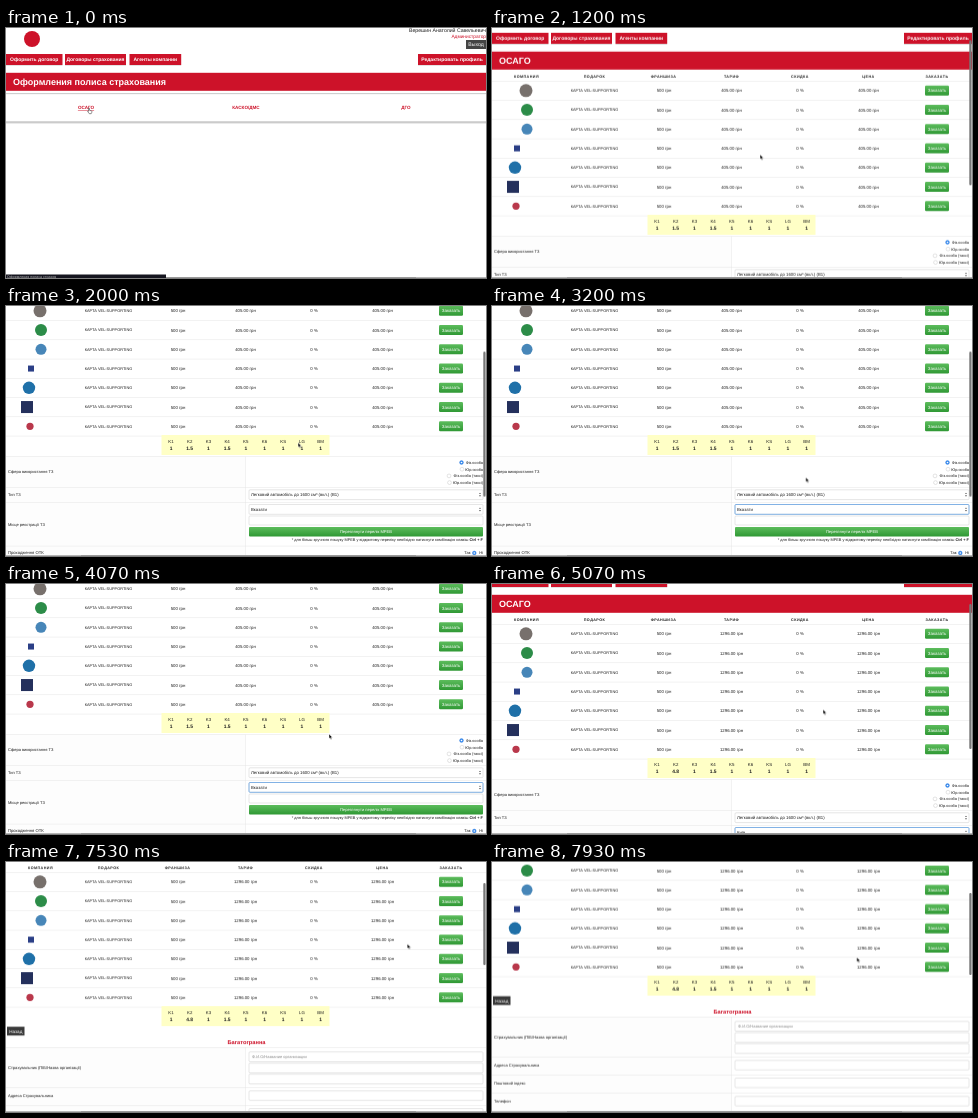
An HTML page for the animation above (8000 ms loop, 480 px wide and 250 px high).

```html
<!DOCTYPE html>
<html lang="uk">
<head>
<meta charset="utf-8">
<title>Оформление полиса</title>
<style>
html, body { margin: 0; width: 100%; height: 100%; overflow: hidden; background: #fff; }
svg { display: block; width: 100vw; height: 100vh; }
text { font-family: "Liberation Sans", Arial, sans-serif; text-rendering: geometricPrecision; }

#page, #thumbTall, #thumbShort, #cursor { animation: 8s linear infinite; }
#page { animation-name: scroll; }
#thumbTall { animation-name: thumb-tall; }
#thumbShort { animation-name: thumb-short; }
#cursor { animation-name: pointer; }
.step { animation: 8s step-end infinite; }
#menu, #status, #hand { animation-name: menu; }
#order, #arrow { animation-name: order; }
#oldPrice, #oldCity { animation-name: before-city; }
#newPrice, #newCity { animation-name: after-city; }
#focus { animation-name: focus; }
#carForm { animation-name: car-form; }
#ownerForm, #shortShown { animation-name: owner-form; }
#hover { animation-name: hover; }
#tallShown { animation-name: tall-shown; }

@keyframes scroll {
  0%, 12.5% { transform: none; }
  15% { transform: translateY(-21px); animation-timing-function: ease-out; }
  21.5%, 59.1% { transform: translateY(-79px); animation-timing-function: ease-out; }
  63.3%, 91.6% { transform: translateY(-34px); animation-timing-function: ease-out; }
  99.1%, 100% { transform: translateY(-94.4px); }
}
@keyframes thumb-tall {
  0%, 12.5% { transform: none; }
  15% { transform: translateY(12.2px); animation-timing-function: ease-out; }
  21.5%, 59.1% { transform: translateY(45.6px); animation-timing-function: ease-out; }
  63.3%, 100% { transform: translateY(20px); }
}
@keyframes thumb-short {
  0%, 91.6% { transform: translateY(11.4px); animation-timing-function: ease-out; }
  99.1%, 100% { transform: translateY(31px); }
}
@keyframes pointer {
  0%, 2.5% { transform: translate(82px, 80px); animation-timing-function: ease-in-out; }
  9.1%, 15% { transform: translate(268px, 126.5px); }
  22%, 25% { transform: translate(292px, 136.5px); animation-timing-function: ease-in-out; }
  32.5%, 35% { transform: translate(300px, 203px); animation-timing-function: ease-in-out; }
  44%, 59.1% { transform: translate(323px, 150px); }
  63.3% { transform: translate(331px, 125.5px); animation-timing-function: ease-in-out; }
  69%, 86% { transform: translate(437px, 66px); }
  91.6% { transform: translate(420px, 75px); }
  99.1%, 100% { transform: translate(364.7px, 95.3px); }
}
@keyframes menu { 0% { opacity: 1; } 4.1%, 100% { opacity: 0; } }
@keyframes order { 0% { opacity: 0; } 4.1%, 100% { opacity: 1; } }
@keyframes before-city { 0% { opacity: 1; } 52.4%, 100% { opacity: 0; } }
@keyframes after-city { 0% { opacity: 0; } 52.4%, 100% { opacity: 1; } }
@keyframes focus { 0% { opacity: 0; } 34.1%, 100% { opacity: 1; } }
@keyframes car-form { 0% { opacity: 1; } 76.6%, 100% { opacity: 0; } }
@keyframes owner-form { 0% { opacity: 0; } 76.6%, 100% { opacity: 1; } }
@keyframes hover { 0% { opacity: 0; } 69% { opacity: 1; } 88%, 100% { opacity: 0; } }
@keyframes tall-shown { 0% { opacity: 0; } 12.5% { opacity: 1; } 45% { opacity: 0; } 59.1% { opacity: 1; } 76.6%, 100% { opacity: 0; } }
</style>
</head>
<body>
<svg id="stage" viewBox="0 0 480 250" preserveAspectRatio="none"></svg>
<script>
const RED = '#cd1229', GREEN = 'url(#green)', LINE = '#e4e4e4', INK = '#1c1c1c';

const rect = (x, y, w, h, fill, extra = '') =>
  `<rect x="${x}" y="${y}" width="${w}" height="${h}" fill="${fill}" ${extra}/>`;
const circle = (x, y, r, fill, extra = '') =>
  `<circle cx="${x}" cy="${y}" r="${r}" fill="${fill}" ${extra}/>`;
const group = (id, content, cls = 'step') => `<g id="${id}" class="${cls}">${content}</g>`;
// Text is placed by its vertical middle.
const text = (x, y, str, size = 4, { fill = INK, anchor = 'start', bold = false, extra = '' } = {}) =>
  `<text x="${x}" y="${y + size * 0.35}" font-size="${size}" fill="${fill}" text-anchor="${anchor}"
    font-weight="${bold ? 700 : 400}" ${extra}>${str}</text>`;
const mid = (x, y, str, size, opts) => text(x, y, str, size, { anchor: 'middle', ...opts });
const end = (x, y, str, size, opts) => text(x, y, str, size, { anchor: 'end', ...opts });
const rule = y => rect(0, y, 480, 0.5, LINE);
const field = (y, h = 9.8) =>
  rect(243, y, 234, h, '#fff', 'rx="1" stroke="#ccc" stroke-width=".5"');

function button(x, y, w, h, label, fill, size, bold, extra = '') {
  return rect(x, y, w, h, fill, extra) +
    mid(x + w / 2, y + h / 2, label, size, { fill: '#fff', bold });
}

function select(y, label) {
  return field(y) + text(245, y + 5, label, 4.3) +
    `<path d="M473 ${y + 4.3}l1-1.4 1 1.4zM473 ${y + 5.5}l1 1.4 1-1.4z" fill="#555"/>`;
}

function radio(x, y, on) {
  return circle(x, y, 1.9, on ? '#3b8df0' : '#fff', `stroke="${on ? '#2f7ad8' : '#bbb'}" stroke-width=".4"`) +
    (on ? circle(x, y, 0.8, '#fff') : '');
}

function header() {
  const tabs = [[0, 56.5, 'Оформить договор'], [59, 61, 'Договоры страхования'],
    [123.5, 51.7, 'Агенты компании'], [412, 68, 'Редактировать профиль']];
  return circle(26, 11, 8, RED) +
    end(480, 2.6, 'Верешин Анатолий Савельевич', 5.2) +
    end(480, 8.8, 'Администратор', 4.8, { fill: RED }) +
    button(460, 12, 20, 9, 'Выход', '#444', 5.2) +
    tabs.map(([x, w, label]) =>
      rect(x, 37, w, 0.8, '#ddd') + button(x, 26, w, 11, label, RED, 5, true)).join('');
}

const band = title => rect(0, 44.8, 480, 18, RED) +
  text(7, 54, title, 9, { fill: '#fff', bold: true });

function menu() {
  const link = (x, label, extra) => mid(x, 79.8, label, 4.6, { fill: RED, bold: true, extra });
  return band('Оформления полиса страхования') + rect(0, 65.3, 480, 0.8, '#bbb') +
    rect(0, 93.6, 480, 1, '#999') + rect(0, 94.6, 480, 1, '#ddd') +
    link(80, 'ОСАГО', 'text-decoration="underline"') + link(240, 'КАСКО/ДМС') + link(400, 'ДГО');
}

const rows = Array.from({ length: 7 }, (_, i) => 83.8 + i * 19.25);
const orderButton = (y, fill) => button(433, y - 5, 24, 10, 'Заказать', fill, 4.5, false, 'rx="1.2"');

function table() {
  const heads = [[34.5, 'КОМПАНИЯ'], [102.5, 'ПОДАРОК'], [171.5, 'ФРАНШИЗА'], [239.5, 'ТАРИФ'],
    [308, 'СКИДКА'], [376.5, 'ЦЕНА'], [445, 'ЗАКАЗАТЬ']];
  const marks = [
    y => circle(34, y, 6.5, '#77706c'),
    y => circle(35, y, 6, '#2c8c48'),
    y => circle(35, y, 5.5, '#4786b8'),
    y => rect(22, y - 3, 6, 6, '#2b3f86'),
    y => circle(23, y, 6.2, '#1f70a8'),
    y => rect(15, y - 6, 12, 12, '#24305c'),
    y => circle(24, y, 3.6, '#b9384b')];
  return heads.map(([x, label]) =>
      mid(x, 70, label, 3.7, { bold: true, extra: 'letter-spacing=".45"' })).join('') +
    rule(74.2) +
    rows.map((y, i) => marks[i](y) +
      mid(102.5, y, 'КАРТА VEL-SUPPORTING', 3.9) + mid(172, y, '500 грн', 4.3) +
      mid(308, y, '0 %', 4.3) + orderButton(y, GREEN) + rule(y + 9.5)).join('') +
    group('hover', orderButton(rows[1], '#2f8736')) +
    rect(155.5, 208, 168, 20, '#ffffc6');
}

function prices(price, zone) {
  const values = [1, zone, 1, 1.5, 1, 1, 1, 1, 1];
  return rows.map(y => mid(239.5, y, price, 4.3) + mid(376.5, y, price, 4.3)).join('') +
    ['K1', 'K2', 'K3', 'K4', 'K5', 'K6', 'KS', 'LG', 'BM'].map((name, i) => {
      const x = 165 + i * 18.7;
      return mid(x, 214.5, name, 4.4) + mid(x, 221.5, values[i], 4.9, { bold: true });
    }).join('');
}

function carForm() {
  const kinds = ['Фіз.особа', 'Юр.особа', 'Фіз.особа (таксі)', 'Юр.особа (таксі)'];
  const radioX = [455.5, 456, 443, 443.5];
  return rect(0, 229.5, 239, 112, '#fdfdfd') + rect(239, 229.5, 0.5, 112, LINE) +
    [229.3, 260.5, 275.3, 318.8, 334].map(rule).join('') +
    text(2, 245, 'Сфера використання ТЗ') +
    kinds.map((kind, i) => radio(radioX[i], 235.5 + i * 6.7, i === 0) +
      end(477, 235.5 + i * 6.7, kind, 3.9)).join('') +
    text(2, 267.7, 'Тип ТЗ') + select(262.8, 'Легковий автомобіль до 1600 см³ (вкл.) (B1)') +
    text(2, 297.5, 'Місце реєстрації ТЗ') +
    group('oldCity', select(277.5, 'Вказати')) + group('newCity', select(277.5, 'Київ')) +
    group('focus', rect(243, 277.5, 234, 9.8, 'none', 'rx="1" stroke="#78ade6" stroke-width=".9"')) +
    field(289, 9) +
    button(243, 300, 234, 9.6, 'Переглянути перелік МРЕВ', GREEN, 4.1, false, 'rx="1"') +
    end(477, 313, '* для більш зручного пошуку МРЕВ у відкритому переліку необхідно натиснути комбінацію клавіш <tspan font-weight="700">Ctrl + F</tspan>', 3.9) +
    text(2, 326, 'Проходження ОТК', 4.2) +
    end(464.5, 326, 'Так') + radio(468.3, 326, true) + end(477, 326, 'Ні');
}

function ownerForm() {
  const lines = [['Адреса Страхувальника', 298], ['Поштовий індекс', 315.7], ['Телефон', 334]];
  return rect(0, 249, 239, 112, '#fdfdfd') + rect(239, 249, 0.5, 112, LINE) +
    button(1, 228.6, 17.5, 8.8, 'Назад', '#3a3a3a', 4.6) +
    mid(240.5, 244.2, 'Багатогранна', 5.7, { fill: RED, bold: true }) +
    [249, 289, 307, 325, 343].map(rule).join('') +
    text(2, 269.5, 'Страхувальник (ПІБ/Назва організації)', 4.1) +
    [253.8, 265, 276].map(y => field(y)).join('') +
    text(246, 258.7, 'Ф.И.О/Название организации', 4, { fill: '#888' }) +
    lines.map(([label, y]) => text(2, y, label) + field(y - 5.2, 9.5)).join('');
}

const gradient = `<linearGradient id="green" x2="0" y2="1">
  <stop stop-color="#5cbc5c"/><stop offset="1" stop-color="#2f9834"/></linearGradient>`;
const arrow = '<path d="M0 0v4.6l1.1-.9.8 1.8.9-.4-.8-1.7h1.5z" fill="#111" stroke="#fff" stroke-width=".4"/>';
const hand = '<path d="M.5.3q.6-.6 1 0v2l2 .5q.6.4.3 1.5l-.6 1.4H1.3L-.4 3.4q.2-.7.9-.1z" fill="#fff" stroke="#222" stroke-width=".5"/>';
const thumb = (id, h) => rect(477.3, 0, 2.3, h, '#777', `id="${id}" rx="1.1"`);

document.getElementById('stage').innerHTML = gradient +
  group('page',
    header() + group('menu', menu()) +
    group('order', band('ОСАГО') + table() +
      group('oldPrice', prices('405.00 грн', 1.5)) + group('newPrice', prices('1296.00 грн', 4.8)) +
      group('carForm', carForm()) + group('ownerForm', ownerForm())), '') +
  group('tallShown', thumb('thumbTall', 145)) +
  group('shortShown', thumb('thumbShort', 82)) +
  rect(0, 249, 480, 1, '#b5b5b5') + rect(75, 249, 335, 1, '#999') +
  group('status', rect(0, 246.5, 160, 3.5, '#15151f') +
    text(1, 248.6, 'Оформления полиса страхов', 3.6, { fill: '#bbb' })) +
  group('cursor', group('arrow', arrow) + group('hand', hand), '');
</script>
</body>
</html>
```
